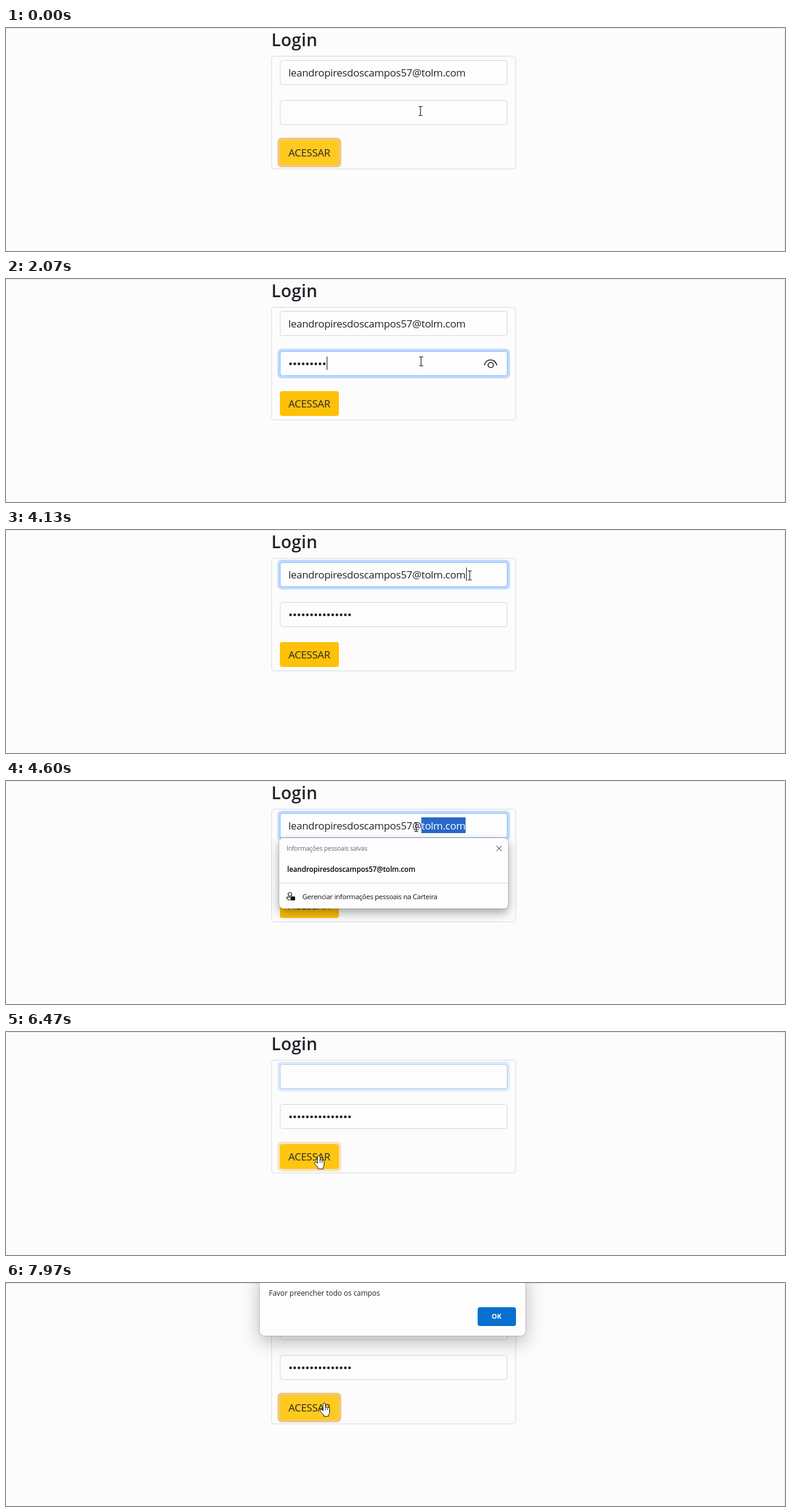
These frames come from a looping animation (1280 px wide and 368 px high, 8 s). An HTML page:

```html
<!DOCTYPE html>
<html lang="pt">
<head>
<meta charset="utf-8">
<style>
  html, body { margin: 0; width: 100%; height: 100%; overflow: hidden; background: #fcfcfc; }
  svg { display: block; }
  text { font-family: "Open Sans", "Noto Sans", sans-serif; fill: #212529; white-space: pre; }
  .email { font-size: 17px; letter-spacing: -.3px; }
  .field { fill: #fdfdfd; stroke: #d3d6da; }
  .ring { fill: #c0dafd; }
  .focused { fill: #fefefe; stroke: #86b7fe; }
  .panel { fill: #fdfdfd; }
  #popup .panel { filter: drop-shadow(0 0 1px #0006) drop-shadow(0 7px 8px #0005); }
  #dialog .panel { filter: drop-shadow(0 0 1px #0005) drop-shadow(0 10px 15px #0004); }
  .line { fill: none; stroke: #222; }
  .pointer { fill: #fff; stroke: #111; stroke-linejoin: round; }
</style>
</head>
<body>
<svg width="1280" height="368" viewBox="0 0 1280 368">
  <path d="M0 .5H1274Q1279.5 .5 1279.5 6V368" fill="none" stroke="#e6e6d4"/>
  <text x="436" y="30" font-size="28.5" font-weight="600" letter-spacing=".2">Login</text>
  <rect x="436.5" y="46.5" width="401" height="186" rx="4" fill="none" stroke="#d9d9e2"/>

  <rect class="field" x="450.5" y="53.5" width="373" height="40" rx="4"/>
  <rect class="field" x="450.5" y="119.5" width="373" height="40" rx="4"/>
  <g id="emailFocus">
    <rect class="ring" x="446" y="49" width="382" height="49" rx="7"/>
    <rect class="focused" x="450.5" y="53.5" width="373" height="40" rx="4"/>
  </g>
  <g id="passFocus">
    <rect class="ring" x="446" y="115" width="382" height="49" rx="7"/>
    <rect class="focused" x="450.5" y="119.5" width="373" height="40" rx="4"/>
  </g>
  <g id="entry">
    <text id="email" class="email" x="464" y="80"></text>
    <clipPath id="selClip"><rect id="clipBox" y="60" height="26"/></clipPath>
    <g clip-path="url(#selClip)">
      <rect x="464" y="60" width="300" height="26" fill="#2868c8"/>
      <text class="email" id="emailLit" x="464" y="80" style="fill:#fff"></text>
    </g>
  </g>
  <path id="dots" fill="none" stroke="#212529" stroke-width="4.5" stroke-linecap="round" stroke-dasharray="0 6.93"/>
  <g id="eye" class="line" stroke-width="1.6">
    <path d="M786 142.5C788 130.5 804 130.5 806.5 142.5"/>
    <circle cx="796.5" cy="142" r="4.3"/>
  </g>
  <path id="caret" stroke="#111"/>

  <rect x="450" y="185" width="97" height="41" rx="4" fill="#ffc107"/>
  <g id="btnFocus">
    <rect x="446" y="181" width="105" height="49" rx="7" fill="#efc884"/>
    <rect x="450" y="185" width="97" height="41" rx="4" fill="#ffca20"/>
  </g>
  <text x="464" y="212" font-size="17" letter-spacing="-.25">ACESSAR</text>

  <g id="popup">
    <rect class="panel" x="449" y="94" width="376" height="116.5" rx="7"/>
    <text x="461" y="115" font-size="10.5" letter-spacing="-.22" style="fill:#686868">Informações pessoais salvas</text>
    <path class="line" d="M806 107l8.5 8.5m0-8.5l-8.5 8.5"/>
    <text id="saved" x="462" y="150" font-size="11.7" font-weight="600" letter-spacing="-.06" style="fill:#000"></text>
    <path d="M449 168.5H825" stroke="#d9d9df"/>
    <g class="line" stroke-width="1.2">
      <circle cx="466.5" cy="187" r="3"/>
      <path d="M467 196.5C462 196.5 461.5 194 461.5 191.7H467"/>
    </g>
    <rect x="467.5" y="190.5" width="7.5" height="6.5" rx="1.2" fill="#111"/>
    <text x="487" y="194.5" font-size="11.5" letter-spacing="-.28" style="fill:#111">Gerenciar informações pessoais na Carteira</text>
  </g>

  <g id="dialog">
    <rect class="panel" x="417" y="-20" width="436.5" height="107" rx="8"/>
    <text x="432" y="21" font-size="12" letter-spacing="-.05">Favor preencher todo os campos</text>
    <rect x="775" y="40" width="63" height="31" rx="4" fill="#0870d0"/>
    <text x="806" y="59" font-size="11" font-weight="700" text-anchor="middle" style="fill:#fff">OK</text>
  </g>

  <g id="ibeam" class="line">
    <path d="M-3-7.5H-1L0-6.5 1-7.5H3.5M0-6.5V6.5M-3 7.5H-1L0 6.5 1 7.5H3.5" stroke-width="1.2"/>
  </g>
  <path id="arrow" class="pointer" d="M0 0V15L3.5 11.8 6 17.5 8.5 16.5 6 11H10.5Z"/>
  <g id="hand">
    <path class="pointer" d="M-2 12V1Q-2-1 0-1T2 1V7Q2 5.5 3.5 5.5T5.5 7.5Q5.5 6.2 7 6.2T8.7 8.2V14Q8.7 17 7 18.5V21H-1V19L-6.5 12.5Q-8 10 -6 9.5T-2 12Z"/>
    <path class="line" d="M2 7V11M5.5 7.5V11"/>
  </g>
</svg>
<script>
const LOOP = 8000;
const EMAIL = 'leandropiresdoscampos57@tolm.com';
const T = {
  passFocus: 450, typing: 1000, emailFocus: 3880, popup: 4230,
  drag: 4250, erase: 5350, leave: 6400, dialog: 7200
};
const KEY_STEP = 130, MAX_DOTS = 15, DOT_GAP = 6.93;
// time, x, y
const MOUSE = [
  [0, 681, 137], [1700, 681, 137], [1760, 682, 136], [3050, 682, 136],
  [3430, 737, 95], [3750, 762, 75], [4250, 762, 75], [4600, 674.5, 76],
  [5050, 461, 73], [5900, 461, 73], [6450, 514, 205], [7400, 514, 205],
  [7750, 523, 199], [LOOP, 523, 199]
];

const $ = id => document.getElementById(id);
const show = (id, on) => $(id).style.display = on ? '' : 'none';
const fade = (id, amount) => $(id).style.opacity = amount;
const ramp = (t, start) => Math.min(1, Math.max(0, (t - start) / 150));
const during = (t, from, to) => t >= from && t < to;
const pulse = t => t % 1000 < 500;

for (const id of ['email', 'emailLit', 'saved']) $(id).textContent = EMAIL;

function mouseAt(t) {
  const i = MOUSE.findIndex(k => k[0] > t);
  const [t0, x0, y0] = MOUSE[i - 1], [t1, x1, y1] = MOUSE[i];
  const u = (t - t0) / (t1 - t0);
  return [x0 + (x1 - x0) * u, y0 + (y1 - y0) * u];
}

function drawMouse(t, x, y) {
  const popup = during(t, T.popup, T.leave);
  const inField = x > 450 && x < 824 && (y > 53 && y < 94 || !popup && y > 119 && y < 160);
  const inButton = !popup && x > 450 && x < 547 && y > 185 && y < 226;
  const kind = inField ? 'ibeam' : inButton ? 'hand' : 'arrow';
  for (const id of ['ibeam', 'arrow', 'hand']) show(id, id === kind);
  $(kind).setAttribute('transform', `translate(${x} ${y})`);
}

function drawSelection(t, x) {
  const text = $('email');
  const end = text.getEndPositionOfChar(EMAIL.length - 1).x;
  let start = end;
  if (t >= T.drag) {
    for (let i = EMAIL.length - 1; i >= 0; i--) {
      const left = text.getStartPositionOfChar(i).x;
      if (left < x - 3) break;
      start = left;
    }
  }
  $('clipBox').setAttribute('x', start);
  $('clipBox').setAttribute('width', end - start);
  return end;
}

function drawCaret(t, dots, emailEnd) {
  let x = 0, y = 62, on = false;
  if (during(t, T.passFocus, T.emailFocus)) {
    const lastKey = T.typing + (MAX_DOTS - 1) * KEY_STEP;
    x = 464.5 + dots * DOT_GAP;
    y = 128;
    on = during(t, T.typing, lastKey) || pulse(t - (t < T.typing ? T.passFocus : lastKey));
  } else if (during(t, T.emailFocus, T.drag)) {
    x = emailEnd + .5;
    on = pulse(t - T.emailFocus);
  } else if (during(t, T.erase, T.leave)) {
    x = 463.4;
    on = pulse(t - T.erase);
  }
  show('caret', on);
  $('caret').setAttribute('d', `M${Math.round(x) + .5} ${y}v22`);
}

function draw(t) {
  const [x, y] = mouseAt(t);
  fade('btnFocus', t < T.leave ? 1 - ramp(t, T.passFocus) : ramp(t, T.leave));
  fade('passFocus', ramp(t, T.passFocus) - ramp(t, T.emailFocus));
  fade('emailFocus', ramp(t, T.emailFocus) - ramp(t, T.leave));

  const dots = Math.max(0, Math.min(MAX_DOTS, Math.floor((t - T.typing) / KEY_STEP) + 1));
  show('dots', dots);
  $('dots').setAttribute('d', `M467.5 140h${Math.max(0, dots - 1) * DOT_GAP + .1}`);
  show('eye', dots && t < T.emailFocus);

  show('entry', t < T.erase);
  const emailEnd = t < T.erase ? drawSelection(t, x) : 0;
  drawCaret(t, dots, emailEnd);

  show('popup', during(t, T.popup, T.leave));
  show('dialog', t >= T.dialog);
  drawMouse(t, x, y);
}

const began = performance.now();
function tick() {
  draw((performance.now() - began) % LOOP);
  requestAnimationFrame(tick);
}
tick();
</script>
</body>
</html>
```
